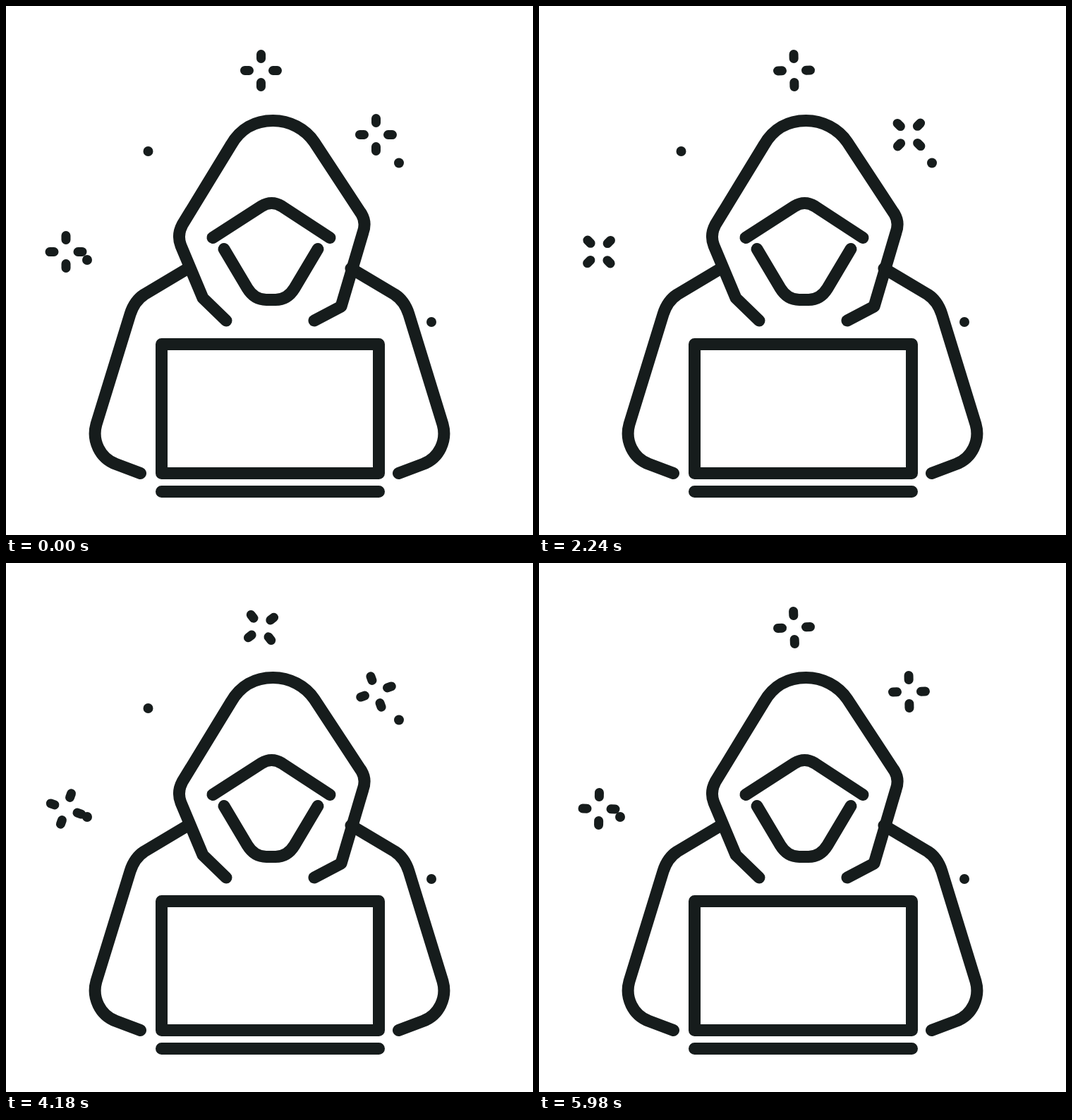
Write an HTML page that moves like this. It is 747 by 750 pixels and loops after 6000 ms.

```html
<!DOCTYPE html>
<html lang="en">
<head>
<meta charset="utf-8">
<title>Hooded figure</title>
<style>
  html, body { margin: 0; width: 100%; height: 100%; overflow: hidden; background: #fff; }
  svg { display: block; width: 100%; height: 100%; }
  .line { fill: none; stroke: #161c1c; stroke-width: 17; stroke-linecap: round; stroke-linejoin: round; }
  .spark { fill: none; stroke: #161c1c; stroke-width: 13; stroke-linecap: round; }
  .dot { fill: #161c1c; }
</style>
</head>
<body>
<svg viewBox="0 0 747 750">
  <g class="line">
    <path id="armL"/>
    <path id="armR" transform="translate(747 0) scale(-1 1)"/>
    <path id="hood"/>
    <path id="brow" d="M293 328.5L362 284Q376.5 275 391 284L459 328.5"/>
    <path id="face"/>
    <path d="M220.5 479.5H528.5V662.5H220.5ZM220.5 688.5H528.5"/>
  </g>
  <g id="extras"></g>
</svg>
<script>
const LOOP = 6000;
const NS = "http://www.w3.org/2000/svg";
const $ = id => document.getElementById(id);

function add(tag, attrs) {
  const el = document.createElementNS(NS, tag);
  for (const k in attrs) el.setAttribute(k, attrs[k]);
  return $("extras").appendChild(el);
}

// Sparkles: centre and speed in degrees per second
const sparks = [[361.5, 91.5, 120], [524.5, 182.5, 60], [85, 348.5, -60]].map(([x, y, speed]) => ({
  x, y, speed,
  el: add("path", { class: "spark", d: "M0-17V-23M0 17V23M-17 0H-23M17 0H23" })
}));

// Dots: centre, blink period and the spans in which the dot is hidden
const dots = [
  [201.5, 206, LOOP, [[2700, 3700], [4800, 6000]]],
  [557, 222.5, 1000, [[700, 1000]]],
  [115, 360, LOOP, [[1800, 3700], [4800, 5650]]],
  [603, 448, 1000, [[700, 960]]]
].map(([cx, cy, period, hidden]) => ({
  period, hidden, el: add("circle", { class: "dot", cx, cy, r: 7 })
}));

// Steps of [time, amount]
const duck = [[260, 0], [1200, 1], [1260, 1], [2200, 0], [2250, 0], [3100, 1], [4150, 0]];
const liftL = [[4220, 0], [4850, 36], [5480, 0]];
const liftR = [[4700, 0], [5330, 36], [5960, 0]];

function sample(steps, t) {
  if (t <= steps[0][0]) return steps[0][1];
  for (let i = 1; i < steps.length; i++) {
    const [t0, a] = steps[i - 1], [t1, b] = steps[i];
    if (t < t1) return a + (b - a) * (1 - Math.cos(Math.PI * (t - t0) / (t1 - t0))) / 2;
  }
  return steps[steps.length - 1][1];
}

function arm(up) {
  const y = v => v - up;
  return `M258 372L196 409Q182 418 176 437L128 ${y(593)}` +
    `C121.5 ${y(616)} 133 ${y(641)} 156 ${y(649.5)}L190.5 ${y(662.5)}`;
}

function hood(k) {
  const m = (a, b) => a + (b - a) * k;
  return `M312 446L279 414L248 340Q242 325 ${m(250, 252)} ${m(310, 305)}` +
    `L${m(319, 321)} ${m(197, 221)}` +
    `C${m(332, 338)} ${m(174, 201)} ${m(353, 357)} ${m(162.5, 188)} 378.5 ${m(162.5, 188)}` +
    `C402 ${m(162.5, 188)} ${m(424, 419)} ${m(174, 200)} ${m(437, 436)} ${m(193, 219)}` +
    `L${m(504, 501)} ${m(295, 291)}Q511 ${m(307, 304)} 506 321L475 426L437 446`;
}

function face(k) {
  const m = (a, b) => a + (b - a) * k;
  const tip = m(344.5, 308), x = m(342, 340), y = m(400, 395), cx = m(352, 348);
  return `M309 ${tip}L${x} ${y}Q${cx} 416.5 369 416.5H382` +
    `Q${751 - cx} 416.5 ${751 - x} ${y}L442 ${tip}`;
}

function draw(t) {
  const k = sample(duck, t);
  $("hood").setAttribute("d", hood(k));
  $("face").setAttribute("d", face(k));
  $("brow").setAttribute("transform", `translate(0 ${-39 * k})`);
  $("armL").setAttribute("d", arm(sample(liftL, t)));
  $("armR").setAttribute("d", arm(sample(liftR, t)));
  for (const s of sparks)
    s.el.setAttribute("transform", `translate(${s.x} ${s.y}) rotate(${s.speed * t / 1000})`);
  for (const d of dots) {
    const p = t % d.period;
    const off = d.hidden.some(([a, b]) => p >= a && p < b);
    d.el.setAttribute("visibility", off ? "hidden" : "visible");
  }
}

function tick() {
  draw(performance.now() % LOOP);
  requestAnimationFrame(tick);
}
tick();
</script>
</body>
</html>
```
